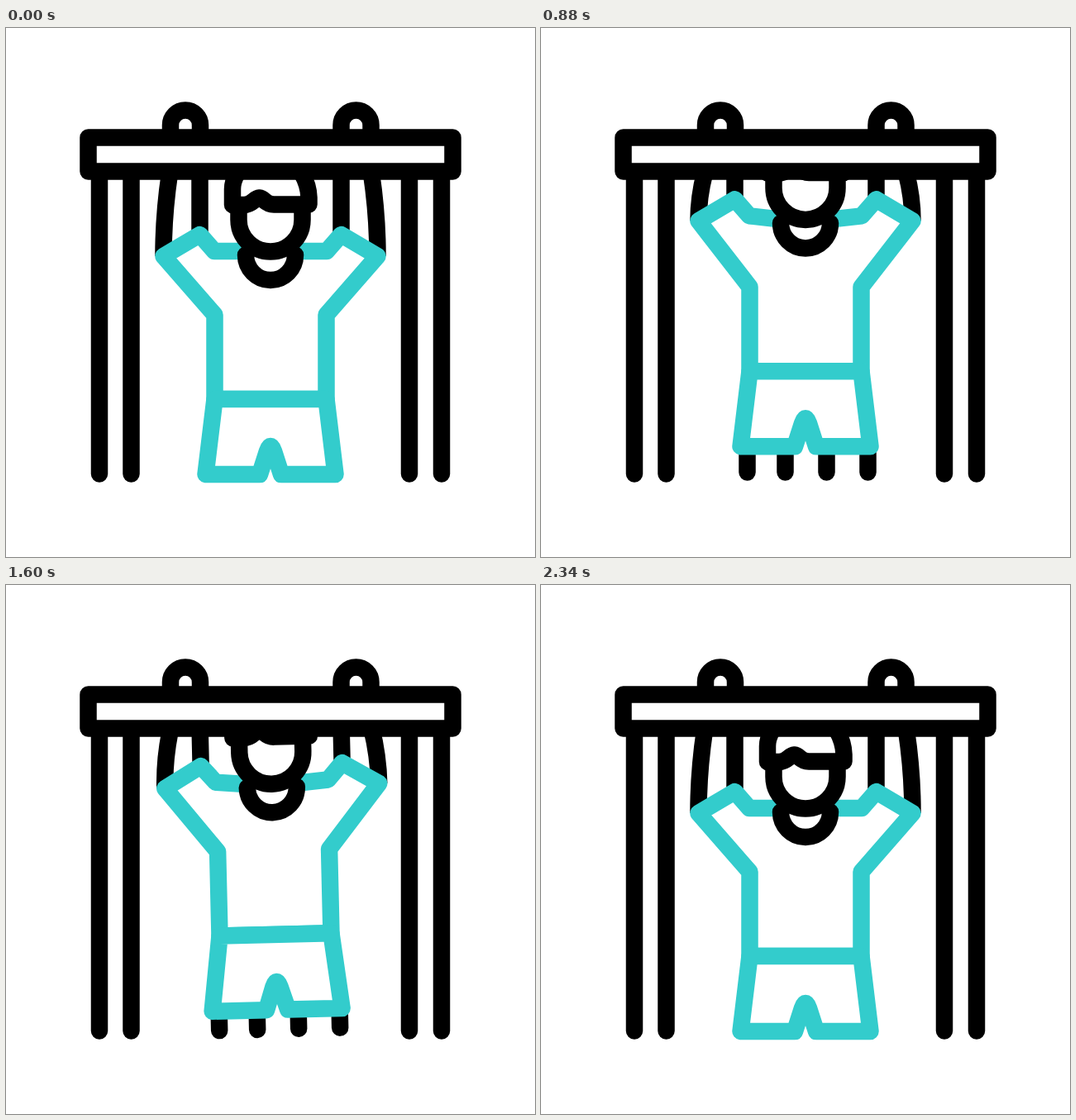
These frames come from a looping animation (640x640 px, 2400 ms). An HTML page:

```html
<!DOCTYPE html>
<html lang="en">
<head>
<meta charset="utf-8">
<title>Pull-ups</title>
<style>
  html, body { margin: 0; width: 100%; height: 100%; overflow: hidden; background: #fff; }
  svg { display: block; width: 100vw; height: 100vh; }
  path, rect { fill: none; stroke: #000; stroke-width: 20.5; stroke-linejoin: round; }
  .round { stroke-linecap: round; }
  .cloth { stroke: #33cccc; fill: #fff; }
</style>
</head>
<body>
<svg viewBox="0 0 640 640">
  <clipPath id="underBar"><path d="M0 165H640V640H0z"/></clipPath>
  <g clip-path="url(#underBar)">
    <g id="athlete">
      <path id="arms"/>
      <path id="legs" class="round"/>
      <path id="shirt" class="cloth"/>
      <path id="shorts" class="cloth"/>
      <g id="head">
        <path class="round" d="M290 274.500a30 30.500 0 0 0 60 0"/>
        <path d="M281.500 214V232a38.500 38.500 0 0 0 77 0V214"/>
        <path d="M279 177Q274 186 274 195V214H288C298 214 300 206 306.500 205.500C313 206 313 213.500 324 213.500H366.500V205Q366 190 358 176"/>
      </g>
    </g>
  </g>
  <path class="round" d="M113 174V539.500M151.500 174V539.500M488 174V539.500M527 174V539.500"/>
  <path d="M199 130V117.500a18 18 0 0 1 36 0V130M405.500 130V117.500a18 18 0 0 1 36 0V130"/>
  <rect x="99.500" y="132.500" width="441" height="41" style="fill:#fff"/>
</svg>
<script>
  const STEP = 20, STEPS = 120;
  const liftKeys = [[1, 0], [36, 61], [58, 0], [60, 0], [98, 61], [116.5, 0]];
  const tiltKeys = [[57, 0], [66, -2.28], [74, 3.7], [82, -2.28], [96, 2.7], [110, 0]];
  const el = id => document.getElementById(id);
  const setPath = (id, d) => el(id).setAttribute('d', d);
  const mirror = points => points.map(([x, y]) => [640 - x, y]);
  const line = points => 'M' + points.join('L');

  // Eased value between keys, constant outside them
  function at(keys, t) {
    const i = keys.findIndex(key => key[0] > t);
    if (i === 0) return keys[0][1];
    if (i < 0) return keys[keys.length - 1][1];
    const [t0, a] = keys[i - 1], [t1, b] = keys[i];
    const x = (t - t0) / (t1 - t0);
    return a + (b - a) * x * x * (3 - 2 * x);
  }

  function draw(t) {
    const lift = at(liftKeys, t), tilt = at(tiltKeys, t);
    const torso = lift * 0.79, skull = lift * 0.905;
    const hand = 250 - lift, elbow = 276 - lift;
    const waist = 449 - torso, hem = 540 - torso;

    el('athlete').setAttribute('transform', `rotate(${tilt} 320 168)`);
    el('head').setAttribute('transform', `translate(0 ${-skull})`);

    const bend = (176 + elbow) / 2;
    setPath('arms',
      `M198 176Q190.500 ${bend} 190.500 ${elbow}M234.500 170V${hand}` +
      `M442 176Q449.500 ${bend} 449.500 ${elbow}M405.500 170V${hand}`);
    setPath('legs', [249.5, 295.5, 345.5, 395.5].map(x => `M${x} ${Math.min(hem, 537)}V537.500`).join(''));

    const side = [
      [288, 270 - skull], [252, 270 - lift], [234.5, hand],
      [190.5, elbow], [252.5, 347 - torso], [252.5, waist]
    ];
    setPath('shirt', line([...side, ...mirror(side).reverse()]));
    setPath('shorts',
      `M252.500 ${waist}L241.500 ${hem}H307L316 ${hem - 28}Q320 ${hem - 40} 324 ${hem - 28}` +
      `L333 ${hem}H398.500L387.500 ${waist}Z`);
  }

  function tick() {
    draw(Math.floor(performance.now() / STEP) % STEPS);
    requestAnimationFrame(tick);
  }
  tick();
</script>
</body>
</html>
```
